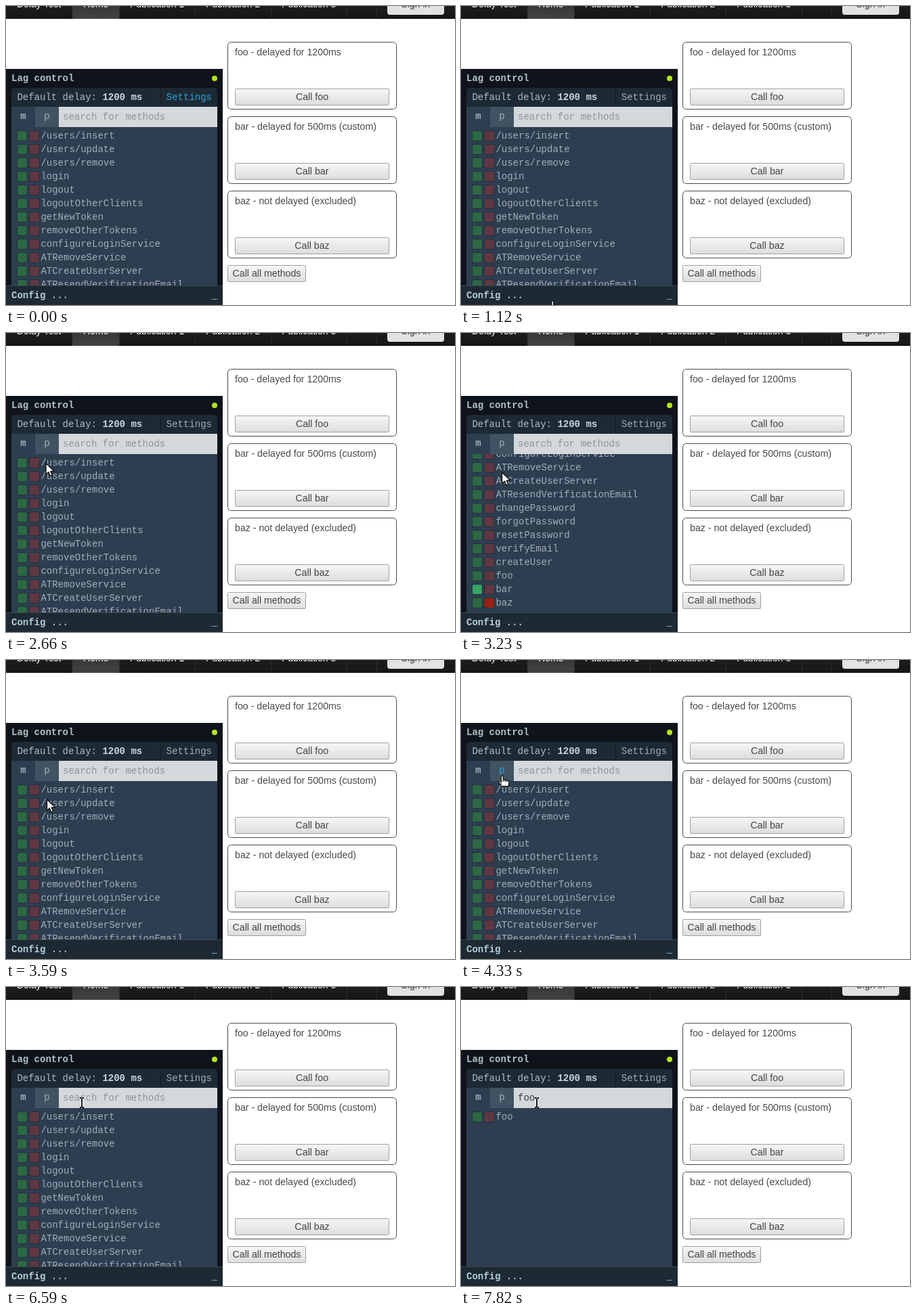
An HTML page with a canvas that plays this animation: 663 px wide and 442 px high, repeating every 8 s.

```html
<!DOCTYPE html>
<html lang="en">
<head>
<meta charset="utf-8">
<title>Lag control</title>
<style>
html, body { margin: 0; width: 100%; height: 100%; overflow: hidden; background: #fff; }
canvas { display: block; }
</style>
</head>
<body>
<canvas id="stage" width="663" height="442"></canvas>
<script>
const ctx = document.getElementById('stage').getContext('2d');
const LOOP = 8000;
const MONO = '14px "Liberation Mono", monospace';
const BOLD = 'bold ' + MONO;
const NAV = '14px "Liberation Sans", Arial, sans-serif';
const SANS = '14.2px "Liberation Sans", Arial, sans-serif';
const BLUE = '#2fa4e0', LIST_BG = '#2d3e50', TAB_BG = '#415362', LABEL = '#a4afb6';
const ROW = 20, CHAR = 8.4, TAB = 35, CELL = 112;
const LIST = { x: 8, y: 179, w: 304, h: 234 };

const methods = ['/users/insert', '/users/update', '/users/remove', 'login', 'logout',
  'logoutOtherClients', 'getNewToken', 'removeOtherTokens', 'configureLoginService',
  'ATRemoveService', 'ATCreateUserServer', 'ATResendVerificationEmail', 'changePassword',
  'forgotPassword', 'resetPassword', 'verifyEmail', 'createUser', 'foo', 'bar', 'baz'];
const publications = ['meteor_autoupdate_clientVersions', 'meteor.loginServiceConfiguration',
  'publication1', 'publication2', 'publication3'];
const MAX_SCROLL = methods.length * ROW + 7 - LIST.h + 20 - ROW;

// Pointer moves; bend is the sideways bulge at mid-move
const entry = { at: 1120, x: 135.5, y: 436 };
const moves = [
  { at: 1120, end: 1920, x: 73, y: 287, bend: [-28, -148] },
  { at: 1960, end: 2660, x: 59, y: 192.5 },
  { at: 2940, end: 3230, x: 60.5, y: 206 },
  { at: 3850, end: 4330, x: 61, y: 171 },
  { at: 4650, end: 5460, x: 28, y: 166, bend: [38, 115] },
  { at: 5630, end: 5790, x: 112, y: 171 }
];

const clamp = v => Math.max(0, Math.min(1, v));
const ease = v => v * v * (3 - 2 * v);
const mix = (a, b, k) => a + (b - a) * k;

function rect(x, y, w, h, fill) {
  ctx.fillStyle = fill;
  ctx.fillRect(x, y, w, h);
}

function round(x, y, w, h, r, fill, stroke, line = 1) {
  ctx.beginPath();
  ctx.roundRect(x, y, w, h, r);
  if (fill) { ctx.fillStyle = fill; ctx.fill(); }
  if (stroke) { ctx.strokeStyle = stroke; ctx.lineWidth = line; ctx.stroke(); }
}

function text(s, x, y, font, fill, align = 'left') {
  ctx.font = font;
  ctx.fillStyle = fill;
  ctx.textAlign = align;
  ctx.fillText(s, x, y);
}

function vertical(y0, y1, from, to) {
  const g = ctx.createLinearGradient(0, y0, 0, y1);
  g.addColorStop(0, from);
  g.addColorStop(1, to);
  return g;
}

function pointerAt(t) {
  if (t < entry.at) return null;
  let { x, y } = entry;
  for (const m of moves) {
    if (t < m.at) break;
    const k = ease(clamp((t - m.at) / (m.end - m.at)));
    const [bx, by] = m.bend || [0, 0];
    const bulge = Math.sin(Math.PI * k);
    x = mix(x, m.x, k) + bx * bulge;
    y = mix(y, m.y, k) + by * bulge;
  }
  return { x, y };
}

function hitArea({ x, y }) {
  if (y >= LIST.y + LIST.h) return 'footer';
  if (y < 149 || y >= LIST.y) return 'list';
  return x < 43 ? 'm' : x < 78 ? 'p' : 'input';
}

// The wheel moves the list down in six notches and back up in three
function scrollAt(t) {
  const notches = (at, gap, n) => clamp((Math.floor((t - at) / gap) + 1) / n);
  return MAX_SCROLL * (notches(2940, 58, 6) - notches(3510, 40, 3));
}

function queryAt(t) {
  return 'foo'.slice(0, Math.max(0, Math.floor((t - 7080) / 70) + 1));
}

function caretOn(t) {
  return (t >= 5990 && t < 6590) || (t >= 7080 && t < 7820);
}

function drawNav() {
  rect(0, 0, 663, 19, vertical(0, 19, '#1d1d1d', '#161616'));
  rect(0, 18, 663, 1, '#101010');
  for (let i = 0; i < 4; i++) rect(167 + CELL * i, 0, 1, 18, '#2c2c2c');
  rect(547, 0, 1, 18, '#2c2c2c');
  rect(98, 0, 69, 19, vertical(0, 19, '#383838', '#424242'));
  text('Delay Test', 16, 2, NAV, '#fff');
  text('Home', 114, 2, NAV, '#fff');
  for (let i = 0; i < 3; i++) text('Publication ' + (i + 1), 183 + CELL * i, 2, NAV, '#fff');
  round(563, -20, 84, 33, 4, '#e2e2e2');
  text('Sign in', 605, 2, NAV, '#333', 'center');
}

function drawButton(label, x, y, w) {
  round(x + .5, y + .5, w - 1, 24, 1, vertical(y, y + 25, '#f7f7f7', '#dcdcdc'), '#a0a0a0');
  text(label, x + w / 2, y + 17, SANS, '#444', 'center');
}

function drawPage() {
  rect(0, 0, 663, 442, '#fff');
  drawNav();
  const notes = { foo: 'delayed for 1200ms', bar: 'delayed for 500ms (custom)', baz: 'not delayed (excluded)' };
  Object.entries(notes).forEach(([name, note], i) => {
    const y = 53 + 110 * i;
    round(327.5, y + .5, 249, 99, 5, '#fff', '#4a4a4a');
    text(name + ' - ' + note, 338, y + 20, SANS, '#4a4a4a');
    drawButton('Call ' + name, 338, y + 69, 228);
  });
  drawButton('Call all methods', 327, 383, 116);
}

function drawRow(name, y) {
  const green = name === 'bar' ? '#35a365' : '#2c6843';
  const red = name === 'baz' ? '#9b2012' : '#5f3742';
  round(16.5, y - 6.5, 15, 15, 3, green, '#20303c');
  round(34.5, y - 6.5, 15, 15, 3, red, '#20303c');
  text(name, 51.4, y + 5, MONO, LABEL);
}

function drawList(t, tab) {
  const { x, y, w, h } = LIST;
  rect(x, y, w, h, LIST_BG);
  ctx.save();
  ctx.beginPath();
  ctx.rect(x, y, w, h);
  ctx.clip();
  const names = tab === 'm' ? methods.filter(n => n.includes(queryAt(t))) : publications;
  const top = y + 12 - Math.round(scrollAt(t));
  names.forEach((name, i) => drawRow(name, top + ROW * i));
  ctx.restore();
}

function drawTabs(t, tab, hover) {
  ['m', 'p'].forEach((name, i) => {
    const active = tab === name;
    rect(8 + TAB * i, 149, TAB, 30, active ? LIST_BG : TAB_BG);
    text(name, 25.5 + TAB * i, 167, active ? BOLD : MONO, hover === name ? BLUE : LABEL, 'center');
  });
  rect(78, 149, 234, 30, '#d4d8db');
  const query = queryAt(t);
  text(query || 'search for methods', 84, 168, MONO, query ? '#3c3c3c' : '#8f9497');
  if (caretOn(t)) rect(84 + Math.floor(CHAR * query.length), 156, 1, 16, '#333');
}

function drawPanel(t, hover) {
  const tab = t >= 4450 && t < 5630 ? 'p' : 'm';
  rect(0, 93, 320, 349, '#0f141a');
  text('Lag control', 8, 111, BOLD, '#b0c1cc');
  round(304, 103, 8, 8, 4, '#b2e61d');

  round(8, 121, 304, 28, [5, 5, 0, 0], '#1d2934');
  rect(228, 121, 1, 28, '#131c24');
  text('Default delay:', 16.4, 139, MONO, '#b3bec6');
  text('1200 ms', 142.4, 139, BOLD, '#c3d8e4');
  const calm = clamp((t - 80) / 360);
  text('Settings', 236.8, 139, MONO, BLUE);
  ctx.globalAlpha = calm;
  rect(230, 124, 80, 22, '#1d2934');
  text('Settings', 236.8, 139, MONO, LABEL);
  ctx.globalAlpha = 1;

  drawList(t, tab);
  drawTabs(t, tab, hover);

  rect(0, 413, 320, 29, '#1d2933');
  rect(0, 413, 320, 1, '#3a4854');
  text('Config ...', 8, 432, BOLD, '#b3cfdc');
  text('_', 303.6, 432, MONO, '#b3cfdc');
}

function drawArrow() {
  ctx.beginPath();
  const half = [[0, 0], [0, 16.5], [3.8, 13], [6.4, 19], [9.2, 17.8], [6.7, 12], [12, 11.7]];
  half.forEach(([x, y]) => ctx.lineTo(x, y));
  ctx.closePath();
  ctx.lineJoin = 'round';
  ctx.lineWidth = 1.4;
  ctx.strokeStyle = '#111';
  ctx.fillStyle = '#fff';
  ctx.fill();
  ctx.stroke();
}

function drawHand() {
  const part = (x, y, w, h, r) => round(x, y, w, h, r, '#fff', '#111', 1.2);
  part(-4.6, 8, 5, 4.5, 2);
  part(-2, 8, 11.6, 7.5, 2);
  for (let i = 3; i >= 0; i--) part(-1.6 + 2.8 * i, i ? 4.6 + .8 * i : 0, 2.8, i ? 5 : 10, 1.4);
  rect(-1.2, 9, 10.2, 5, '#fff');
}

function drawBeam() {
  rect(-2, -7, 4, 15, '#fff');
  rect(-1, -6, 2, 13, '#111');
  for (const y of [-8, 6]) {
    rect(-3, y, 2.5, 2, '#111');
    rect(.5, y, 2.5, 2, '#111');
  }
}

function drawPointer({ x, y }, area) {
  ctx.save();
  ctx.translate(x, y);
  if (area === 'input') drawBeam();
  else if (area === 'list') drawArrow();
  else drawHand();
  ctx.restore();
}

function draw(t) {
  const pointer = pointerAt(t);
  const area = pointer && hitArea(pointer);
  drawPage();
  drawPanel(t, area);
  if (pointer) drawPointer(pointer, area);
}

const start = performance.now();
function tick() {
  draw((performance.now() - start) % LOOP);
  requestAnimationFrame(tick);
}
tick();
</script>
</body>
</html>
```
